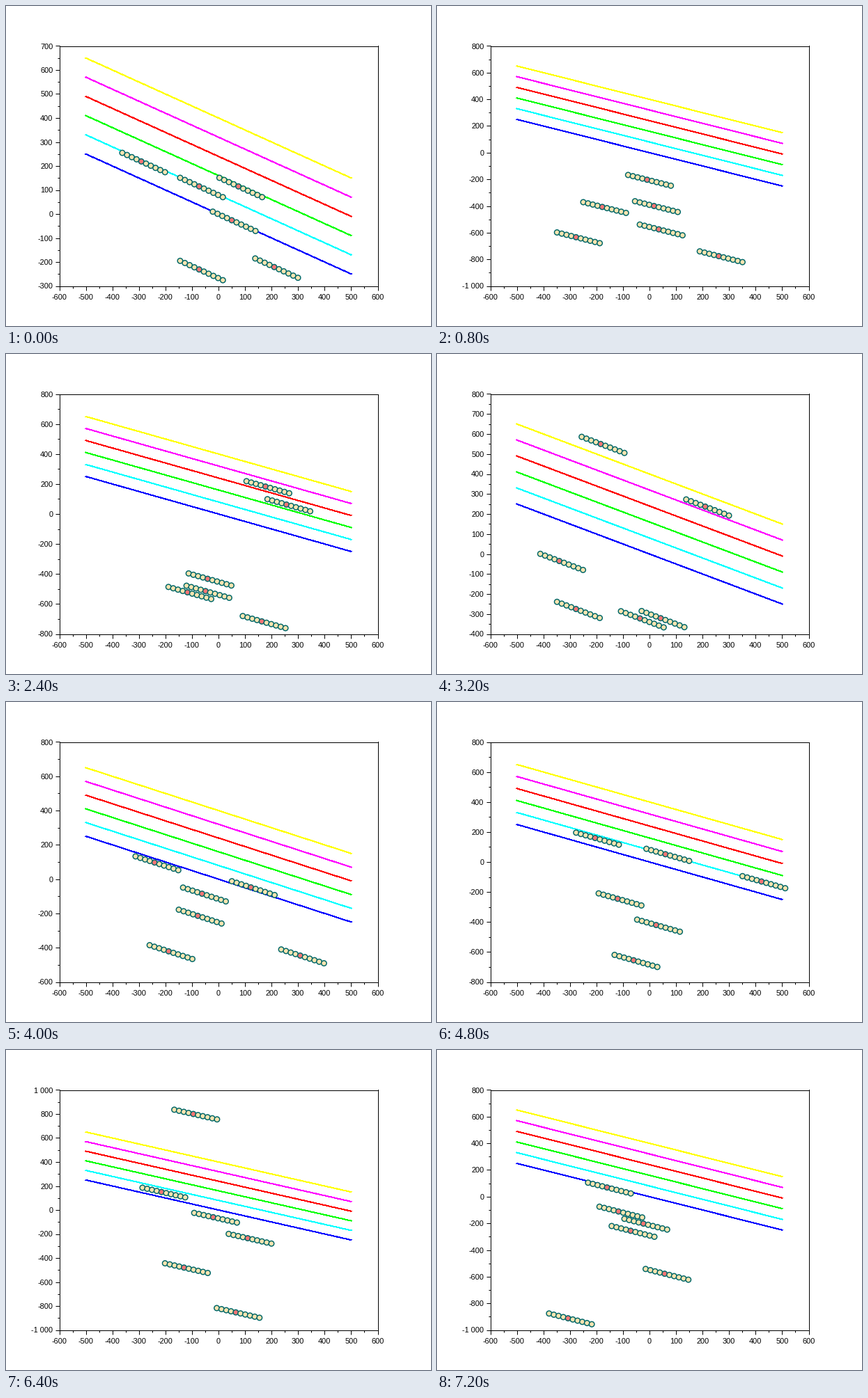
A matplotlib script that plays this animation: 610 px wide and 460 px high, repeating every 8000 ms.

```python
import matplotlib.pyplot as plt
import numpy as np
from matplotlib.animation import FuncAnimation
from matplotlib.ticker import FuncFormatter, MultipleLocator

W, H, DPI = 610, 460, 80
PX = 72 / DPI  # points per pixel
LEFT, RIGHT, TOP, BOTTOM = 76.5, 533.5, 57.5, 402.5

LINE_COLORS = ["#0000ff", "#00ffff", "#00ff00", "#ff0000", "#ff00ff", "#ffff00"]
BEAD, HEAD, EDGE = "#ffe4b0", "#f87474", "#006868"

BEADS, HEAD_INDEX, SPACING = 10, 4, 20
STEP = SPACING * np.array([2, -1]) / np.sqrt(5)
CHAIN = (np.arange(BEADS) - HEAD_INDEX)[:, None] * STEP

# Each scene: lower limit, upper limit, head position of every chain
SCENES = [
    (-300, 700, [(-291, 219), (-73, 115), (75, 115),
                 (50, -26), (-73, -231), (210, -221)]),
    (-1000, 800, [(-9, -203), (-178, -407), (17, -400),
                  (35, -575), (-277, -634), (261, -776)]),
    (-300, 700, [(-212, 330), (118, 262), (-62, 148),
                 (196, 24), (-148, -92), (40, -204)]),
    (-800, 800, [(177, 183), (256, 63), (-41, -432),
                 (-117, -522), (-49, -514), (163, -716)]),
    (-400, 800, [(-184, 550), (210, 237), (-340, -35),
                 (-277, -275), (-36, -322), (42, -321)]),
    (-600, 800, [(-241, 97), (-62, -85), (122, -48),
                 (-78, -214), (-188, -421), (308, -446)]),
    (-800, 800, [(-205, 160), (60, 52), (422, -130),
                 (-120, -245), (25, -420), (-60, -655)]),
    (-1000, 800, [(-277, 228), (-38, 129), (-167, -70),
                  (-117, -134), (32, -300), (32, -802)]),
    (-1000, 1000, [(-95, 800), (-215, 150), (-20, -60),
                   (110, -235), (-130, -480), (65, -853)]),
    (-1000, 800, [(-160, 69), (-117, -111), (-23, -202),
                  (-71, -256), (57, -578), (-307, -912)]),
]

plt.rcParams["font.family"] = "Liberation Sans"

fig = plt.figure(figsize=(W / DPI, H / DPI), dpi=DPI, facecolor="white")
ax = fig.add_axes([LEFT / W, 1 - BOTTOM / H, (RIGHT - LEFT) / W, (BOTTOM - TOP) / H])
ax.set_xlim(-600, 600)
ax.xaxis.set_major_locator(MultipleLocator(100))
ax.xaxis.set_minor_locator(MultipleLocator(50))
ax.yaxis.set_major_formatter(FuncFormatter(lambda v, _: f"{v:,.0f}".replace(",", " ")))
ax.xaxis.set_major_formatter(FuncFormatter(lambda v, _: f"{v:.0f}"))
ax.tick_params(which="both", width=PX, labelsize=11 * PX)
ax.tick_params(which="major", length=6 * PX)
ax.tick_params(which="minor", length=3 * PX)
ax.tick_params(axis="x", pad=5.5 * PX)
ax.tick_params(axis="y", pad=3 * PX)
for spine in ax.spines.values():
    spine.set_linewidth(PX)

ends = np.array([-500, 500])
for k, color in enumerate(LINE_COLORS):
    ax.plot(ends, 80 * k - ends / 2, color=color, lw=PX, antialiased=False, zorder=1)

chain_count = len(SCENES[0][2])
fills = [HEAD if i == HEAD_INDEX else BEAD for i in range(BEADS)] * chain_count
beads = ax.scatter(np.zeros(len(fills)), np.zeros(len(fills)), s=(7.5 * PX) ** 2,
                   c=fills, edgecolors=EDGE, linewidths=1.5 * PX, zorder=3)


def update(i):
    low, high, heads = SCENES[i]
    step = 100 if high - low <= 1200 else 200
    ax.yaxis.set_major_locator(MultipleLocator(step))
    ax.yaxis.set_minor_locator(MultipleLocator(step / 2))
    ax.set_ylim(low, high)
    beads.set_offsets(np.concatenate([np.array(h) + CHAIN for h in heads]))
    return [beads]


anim = FuncAnimation(fig, update, frames=len(SCENES), interval=800,
                     repeat=True, repeat_delay=0, blit=False)
plt.show()
```
